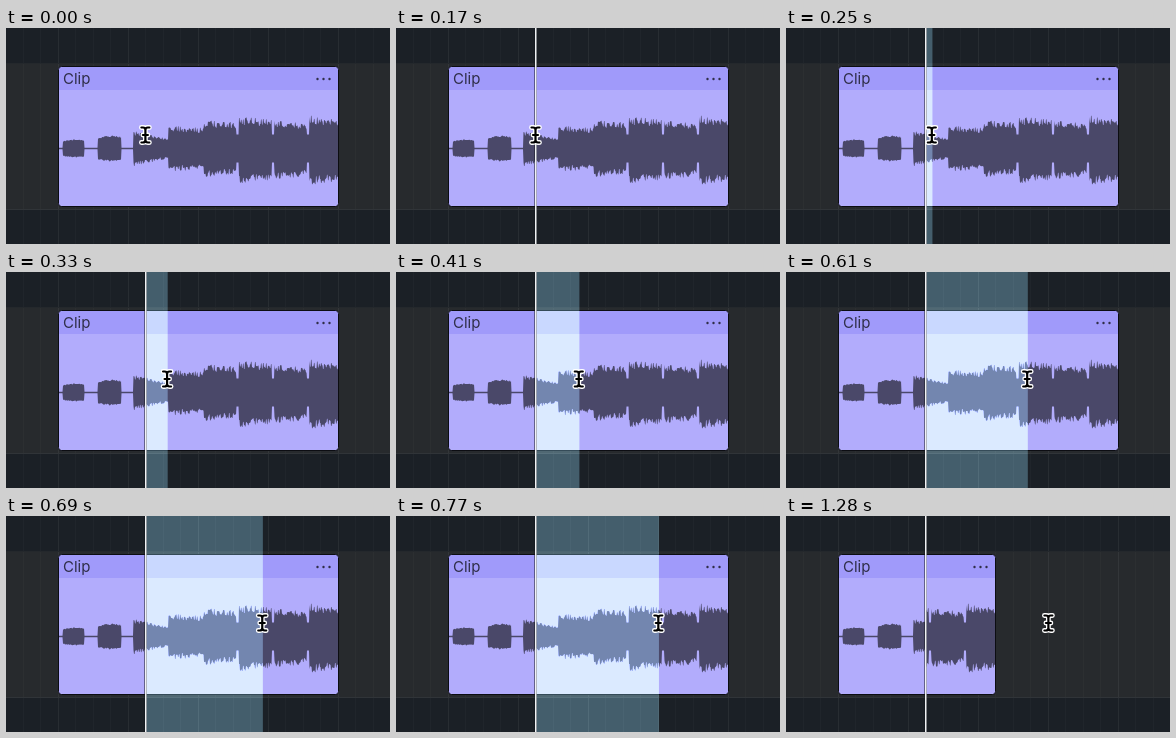
An HTML page with a canvas for the animation above (2130 ms loop, 384 by 216 pixels).

```html
<!DOCTYPE html>
<html>
<head>
<meta charset="utf-8">
<style>
  html, body { margin: 0; width: 100%; height: 100%; overflow: hidden; background: #1b2026; }
  canvas { display: block; width: 384px; height: 216px; }
</style>
</head>
<body>
<canvas id="stage"></canvas>
<script>
const W = 384, H = 216, LOOP = 2130;
const SHOW = 170, CUT = 1280, EASE_START = 160, EASE_TIME = 620;
const LEFT = 53, RIGHT = 332, TOP = 38.5, BOTTOM = 178.5, HEADER = 62;
const SEL = 140, SEL_END = 263, MID = 120.5;
const canvas = document.getElementById('stage');
const c = canvas.getContext('2d');
const dpr = window.devicePixelRatio || 1;
canvas.width = W * dpr;
canvas.height = H * dpr;

// The sound is a row of evenly spaced hits that grow louder
const HIT_START = 56.7, HIT_STEP = 35.25;
const peaks = [9, 13, 18, 23, 29, 32, 28, 33];

function rand(n) {
  const v = Math.sin(n * 127.1 + 11.7) * 43758.5453;
  return v - Math.floor(v);
}

function amplitude(x, side) {
  const pos = (x - HIT_START) / HIT_STEP;
  const hit = Math.floor(pos), phase = pos - hit;
  if (hit < 0 || (hit < 2 && phase > .61 + hit * .05)) return .7;
  if (hit > 3 && phase > .93) return 14;
  const shape = hit < 2 ? .85 + .15 * Math.sin(phase * 4) : 1 - phase * (hit === 2 ? .45 : .1);
  const rough = hit < 2 ? .12 : .26;
  const lower = hit > 4 ? side * .1 : 0;
  return peaks[hit] * shape * (1 + lower - rough * rand(Math.floor(x) + side * 500));
}

const wave = new Path2D();
wave.moveTo(LEFT, MID);
for (let x = LEFT; x <= RIGHT; x += .5) wave.lineTo(x, MID - amplitude(x, 0));
for (let x = RIGHT; x >= LEFT; x -= .5) wave.lineTo(x, MID + amplitude(x, 1));
wave.closePath();

function rect(color, x, y, w, h) {
  c.fillStyle = color;
  c.fillRect(x, y, w, h);
}

function drawGrid() {
  rect('#1b2026', 0, 0, W, H);
  rect('#272a2d', 0, 36, W, 145);
  for (let i = -2; i < 19; i++) {
    const x = Math.floor(52 + i * 17.5);
    rect(`rgba(255,255,255,${i % 4 ? .025 : .06})`, x, 0, 1, H);
  }
  rect('#24282c', 0, 35, W, 1);
  rect('#303438', 0, 181, W, 1);
}

function drawWave(from, to, shift) {
  c.save();
  c.beginPath();
  c.rect(from - shift, HEADER, to - from, BOTTOM - HEADER);
  c.clip();
  c.translate(-shift, 0);
  c.fillStyle = '#4a4869';
  c.fill(wave);
  c.restore();
}

function drawClip(cut) {
  const shift = cut ? SEL_END - SEL : 0, right = RIGHT - shift;
  const outline = new Path2D();
  outline.roundRect(LEFT - .5, TOP, right - LEFT + 1, BOTTOM - TOP, 3);
  c.save();
  c.clip(outline);
  rect('#b2acfc', 0, TOP, W, BOTTOM - TOP);
  rect('#a09afa', 0, TOP, W, HEADER - TOP);
  drawWave(LEFT, cut ? SEL : RIGHT, 0);
  if (cut) drawWave(SEL_END, RIGHT, shift);
  c.restore();
  c.strokeStyle = '#0c0d12';
  c.lineWidth = 1;
  c.stroke(outline);

  c.fillStyle = '#2f2e48';
  c.font = '15px Inter, sans-serif';
  c.fillText('Clip', 57, 56);
  for (let i = 0; i < 3; i++) {
    c.beginPath();
    c.arc(right - 20.5 + i * 6, 51, 1.2, 0, 7);
    c.fill();
  }
}

const beam = new Path2D(
  'M-4 -7.5H-2.5Q0 -7.5 0 -5Q0 -7.5 2.5 -7.5H4M0 -5V5M-4 7.5H-2.5Q0 7.5 0 5Q0 7.5 2.5 7.5H4M-2.5 0H2.5');

function drawCursor(x) {
  c.save();
  c.translate(x, 107);
  c.lineCap = c.lineJoin = 'round';
  c.strokeStyle = '#fff';
  c.lineWidth = 4.8;
  c.stroke(beam);
  c.strokeStyle = '#000';
  c.lineWidth = 2.2;
  c.stroke(beam);
  c.restore();
}

function draw(t) {
  c.setTransform(dpr, 0, 0, dpr, 0, 0);
  const cut = t >= CUT;
  const p = t < SHOW ? 0 : Math.min(1, (t - EASE_START) / EASE_TIME);
  const moved = (1 - Math.cos(Math.PI * p)) / 2 * (SEL_END - SEL);
  drawGrid();
  drawClip(cut);
  if (t >= SHOW) {
    if (!cut) {
      c.globalCompositeOperation = 'lighter';
      rect('rgb(41,62,70)', SEL, 0, moved, H);
      c.globalCompositeOperation = 'source-over';
    }
    rect('rgba(20,22,28,.5)', SEL - 2, 0, 3, H);
    rect('#f0f2f4', SEL - 1, 0, 1.5, H);
  }
  drawCursor(SEL - .6 + moved);
}

function frame() {
  draw(performance.now() % LOOP);
  requestAnimationFrame(frame);
}
frame();
</script>
</body>
</html>
```
